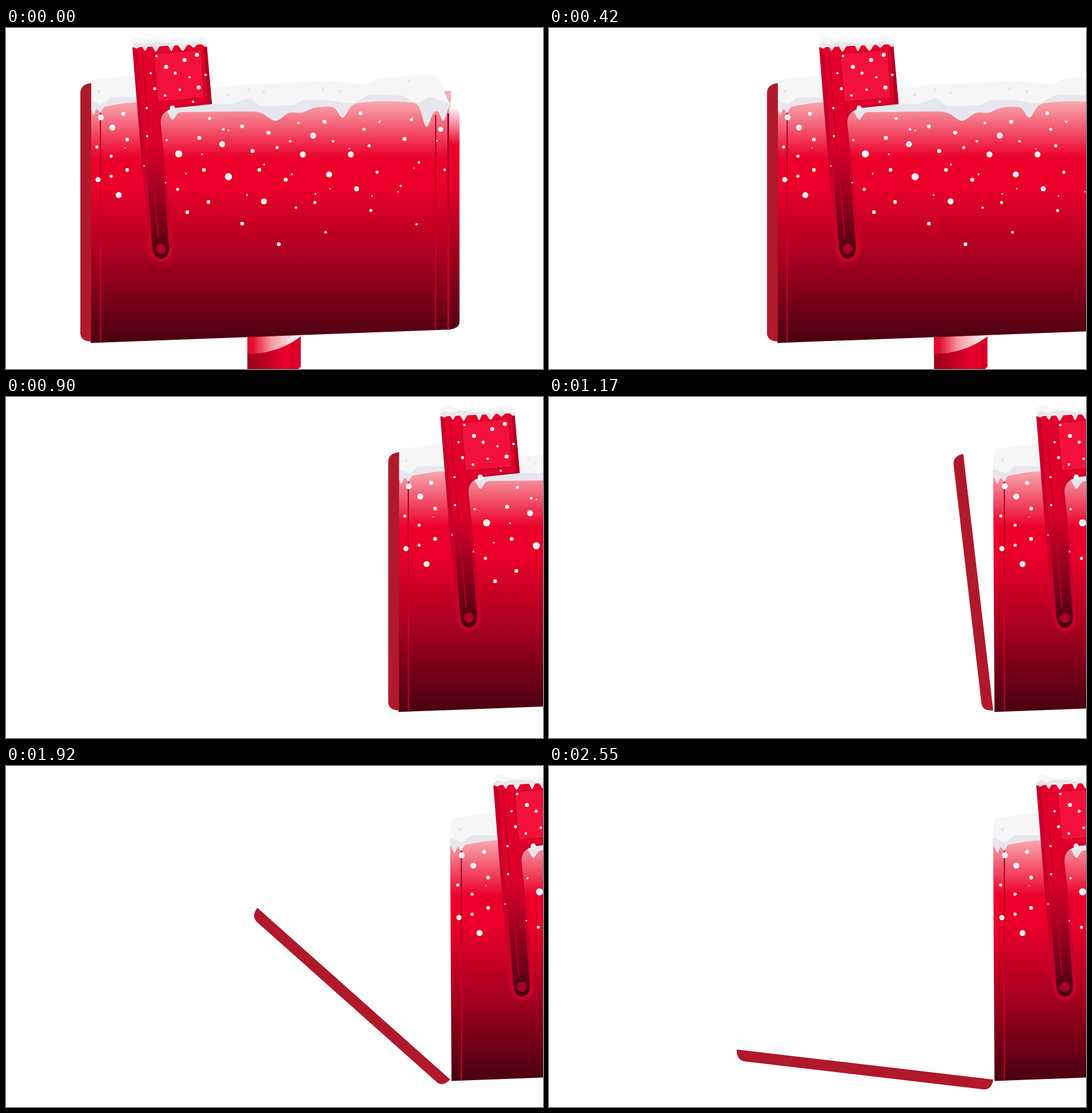
An HTML page for the animation above (2.58 s loop, 939 px wide and 596 px high).

```html
<!DOCTYPE html>
<html lang="en">
<head>
<meta charset="utf-8">
<title>Snowy mailbox</title>
<style>
html, body { margin: 0; width: 100%; height: 100%; overflow: hidden; background: #fff; }
svg { display: block; width: 100vw; height: 100vh; }
</style>
</head>
<body>
<svg viewBox="0 0 939 596" preserveAspectRatio="none">
  <defs>
    <linearGradient id="shell" gradientUnits="userSpaceOnUse" x1="0" y1="125" x2="0" y2="550">
      <stop offset="0" stop-color="#f9b0b4"/>
      <stop offset=".24" stop-color="#eb0029"/>
      <stop offset=".36" stop-color="#ea0029"/>
      <stop offset=".65" stop-color="#a8001f"/>
      <stop offset="1" stop-color="#480011"/>
    </linearGradient>
    <linearGradient id="side" gradientUnits="userSpaceOnUse" x1="0" y1="138" x2="0" y2="530">
      <stop offset="0" stop-color="#fff"/>
      <stop offset=".17" stop-color="#eb0029"/>
      <stop offset=".34" stop-color="#e60029"/>
      <stop offset="1" stop-color="#500013"/>
    </linearGradient>
    <linearGradient id="seam" gradientUnits="userSpaceOnUse" x1="0" y1="148" x2="0" y2="550">
      <stop offset="0" stop-color="#98001f"/>
      <stop offset=".6" stop-color="#cf002a"/>
      <stop offset="1" stop-color="#c4002a"/>
    </linearGradient>
    <linearGradient id="post">
      <stop offset="0" stop-color="#97001d"/>
      <stop offset=".7" stop-color="#e90029"/>
      <stop offset="1" stop-color="#d20026"/>
    </linearGradient>
    <linearGradient id="stripe">
      <stop offset=".1" stop-color="#e60a2e"/>
      <stop offset=".45" stop-color="#f49a9f"/>
      <stop offset="1" stop-color="#fff"/>
    </linearGradient>
    <linearGradient id="arm" gradientUnits="userSpaceOnUse" x1="248" y1="40" x2="272" y2="404">
      <stop offset="0" stop-color="#e4002a"/>
      <stop offset=".45" stop-color="#dc0029"/>
      <stop offset="1" stop-color="#480011"/>
    </linearGradient>
  </defs>
  <g id="box">
    <path d="M422 530H515.5V592L509 598H422Z" fill="url(#post)"/>
    <path d="M422 530H515.5V539Q476 569 422 570Z" fill="url(#stripe)"/>
    <path d="M145.5 110H778V527L148 550.5Z" fill="url(#shell)"/>
    <path d="M775 138H784Q793 141 793 151V513Q793 525 775 527Z" fill="url(#side)"/>
    <g fill="url(#seam)">
      <path d="M164.2 147h2V549h-2Z"/>
      <path d="M750.3 152h2V528h-2Z"/>
      <path d="M771.8 149h3V527h-3Z"/>
    </g>
    <g id="roofSnow"></g>
    <path d="M221 34L351 28L360 133L298 139.5Q268 144 270.5 168L292 378C294 400 284 409 271 409S250 397 249 380Z" fill="#c7002b"/>
    <path d="M229 34L346 29L354 130L297 136Q265 141 268.5 168L285 380C286 396 280 403 271 403S257 395 256 382Z" fill="url(#arm)"/>
    <path d="M346 34L351 33L360 133L353 132Z" fill="#b10026"/>
    <path d="M258 45L341.5 38L346.5 122L265 129Z" fill="#f3113b" stroke="#c4002c" stroke-width="1.6"/>
    <path d="M237.5 40L266 367" stroke="#bd0028" stroke-width="1.7"/>
    <circle cx="271" cy="386" r="8.7" fill="#aa0027"/>
    <g id="flagSnow"></g>
    <g id="dots" fill="#f7f5f7"></g>
  </g>
  <path id="lid" d="M149 96.5Q130 98 130 114V533Q130 547 149 548Z" fill="#af192b"/>
</svg>
<script>
const $ = id => document.getElementById(id);

function add(parent, tag, attrs) {
  const el = document.createElementNS("http://www.w3.org/2000/svg", tag);
  for (const k in attrs) el.setAttribute(k, attrs[k]);
  parent.appendChild(el);
}

const pairs = a => a.flatMap((v, i) => i % 2 ? [] : [[v, a[i + 1]]]);

// Smoothed height between the points of p
function heightAt(p, x) {
  const i = Math.max(1, p.findIndex(q => q[0] >= x));
  const [a, b] = [p[i - 1], p[i]];
  const u = (x - a[0]) / (b[0] - a[0]);
  return a[1] + (b[1] - a[1]) * u * u * (3 - 2 * u);
}

// Icicles are triples of centre, half width and length
function curve(points, icicles = []) {
  const p = pairs(points), out = [];
  const end = p[p.length - 1][0];
  for (let x = p[0][0]; x <= end; x++) {
    let y = heightAt(p, x);
    for (let i = 0; i < icicles.length; i += 3)
      y += icicles[i + 2] * Math.exp(-(((x - icicles[i]) / icicles[i + 1]) ** 2));
    out.push([x, y]);
  }
  return out;
}

function snow(parent, top, edge, drips) {
  const fill = (low, color) =>
    add(parent, "path", { d: `M${top.concat([...low].reverse()).join("L")}Z`, fill: color });
  fill(drips, "#e8e6ed");
  fill(edge, "#f6f6f7");
}

function specks(parent, r, list, fill) {
  for (const [cx, cy] of pairs(list)) add(parent, "circle", { cx, cy, r, ...(fill && { fill }) });
}

snow($("roofSnow"),
  curve([145,108, 152,90, 226,83, 360,104, 440,98, 560,93, 630,98, 654,88, 740,81, 752,85, 778,131]),
  curve([145,126, 166,133, 185,121, 228,121, 360,132, 392,133, 425,123, 447,136, 500,135, 522,126,
    560,126, 600,132, 640,117, 690,118, 720,131, 740,121, 778,132]),
  curve([145,140, 228,130, 300,147, 420,146, 545,138, 660,128, 778,134],
    [153,4,12, 165,4,10, 291,7,14, 472,20,19, 515,18,9, 589,11,22, 735,10,39, 752,12,9, 765,7,26]));

snow($("flagSnow"),
  curve([221,20, 229,15, 250,20, 320,20, 339,14, 351,20]),
  curve([221,30, 229,25, 240,28, 255,24, 310,28, 330,24, 351,28]),
  curve([221,31, 351,28],
    [228,5,5, 243,4,9, 262,5,11, 289,4,11, 309,6,11, 328,5,6, 349,5,5]));

specks($("roofSnow"), 2.4, [162,111, 388,117, 424,108, 451,113, 554,106, 584,111, 705,93], "#e6e6e9");

const dots = $("dots");
specks(dots, 6.2, [302,220, 389,260]);
specks(dots, 5.2, [378,203, 537,188, 519,221, 603,221, 166,156, 186,174, 197,292, 451,303, 565,256]);
specks(dots, 4.5, [161,265, 613,281, 760,177, 291,140]);
specks(dots, 3.6, [338,192, 489,265, 697,194, 312,56, 280,68, 557,164, 205,150, 431,215, 459,183, 334,47, 337,104]);
specks(dots, 3.3, [346,248, 354,304, 317,322, 413,342, 413,172, 443,248, 620,149, 212,195, 212,248, 477,378]);
specks(dots, 2.7, [159,208, 184,224, 184,259, 356,158, 300,282, 474,209, 540,305, 638,319, 649,252, 635,206,
  626,177, 709,160, 296,79, 260,106]);
specks(dots, 2.3, [653,164, 380,177, 722,235, 767,248, 511,166, 497,198, 572,198, 559,357, 278,118, 304,108, 349,82]);
specks(dots, 2, [507,314, 690,276, 718,343, 281,196, 247,189, 263,49, 253,79, 321,86, 246,140, 327,129]);

// Finest flakes
let seed = 7;
const rand = () => (seed = seed * 16807 % 2147483647) / 2147483647;
for (let i = 0; i < 16; i++)
  specks(dots, 1 + rand() * .8, [190 + i * 37 + rand() * 20, 172 + rand() * 130]);

const LOOP = 2580, STEP = 30, OPEN = 1050;
const SPEED = 17.945 / STEP, TURN = 5 / 3 / STEP;

function draw(time) {
  const t = Math.floor(time % LOOP / STEP) * STEP;
  const boxX = Math.min(t * SPEED, 631);
  const lidX = Math.min(t * SPEED, 627.8);
  const angle = -Math.max(0, t - OPEN) * TURN;
  $("box").setAttribute("transform", `translate(${boxX})`);
  $("lid").setAttribute("transform", `translate(${lidX}) rotate(${angle} 149 548)`);
}

let start;
function tick(now) {
  start ??= now;
  draw(Math.max(0, now - start));
  requestAnimationFrame(tick);
}
draw(0);
requestAnimationFrame(tick);
</script>
</body>
</html>
```
